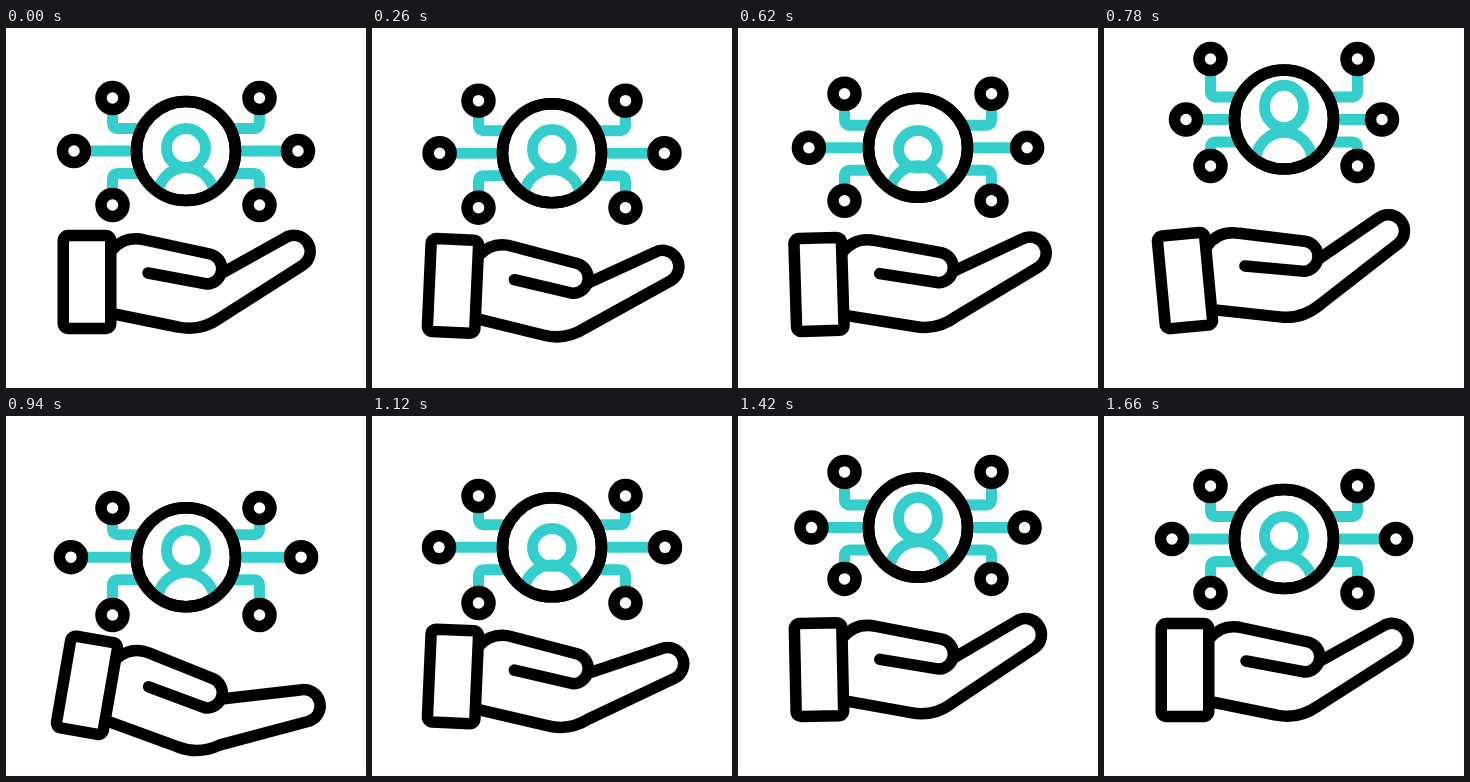
Recreate the animation shown at these times as an HTML page. Size 360 by 360 pixels, loop 1.76 s.

```html
<!DOCTYPE html>
<html lang="en">
<head>
<meta charset="utf-8">
<title>Hand holding a network</title>
<style>
  html, body { margin: 0; width: 100%; height: 100%; overflow: hidden; background: #fff; }
  svg { display: block; width: 100vw; height: 100vh; }
  .ink { fill: none; stroke: #000; stroke-width: 11.5; stroke-linecap: round; stroke-linejoin: round; }
  .teal { fill: none; stroke: #34cfcd; stroke-width: 11; }
  .solid { fill: #fff; }
</style>
</head>
<body>
<svg viewBox="0 0 360 360">
  <defs><clipPath id="clip"><circle id="hole" cx="180" r="50"/></clipPath></defs>
  <path id="wires" class="teal"/>
  <g id="nodes"></g>
  <circle id="ring" class="ink solid" cx="180" r="49.5"/>
  <g clip-path="url(#clip)">
    <ellipse id="head" class="teal" cx="180" rx="19.5"/>
    <path id="body" class="teal"/>
  </g>
  <circle id="rim" class="ink" cx="180" r="49.5"/>
  <g id="arm">
    <path class="ink" d="M25 -32Q38 -47 58 -42L123 -28A15.2 15.2 0 0 1 120 2L61 -9"/>
    <path id="finger" class="ink"/>
    <rect class="ink solid" x="-23.75" y="-46.5" width="47.5" height="93" rx="5"/>
  </g>
</svg>
<script>
const LOOP = 1760;

// Two bounces: share of the lowered and raised pose at each time,
// and how strongly lagging parts trail on the way there
const keys = [
  { at: 220,  low: 0, high: 0,    drag: 0 },
  { at: 375,  low: 1, high: 0,    drag: 0.5 },
  { at: 777,  low: 0, high: 1,    drag: 0.8 },
  { at: 980,  low: 1, high: 0,    drag: 0.5 },
  { at: 1266, low: 0, high: 0.68, drag: 0.5 },
  { at: 1545, low: 0, high: 0,    drag: 0.5 }
];

const parts = {
  angle: { rest: 0,     low: 10.9,  high: -5.4,  lag: -0.3 },
  wrist: { rest: 254,   low: 270.5, high: 252.5, lag: -0.3 },
  flex:  { rest: 0,     low: 11,    high: 0,     lag: 0.2 },
  ring:  { rest: 123,   low: 148.5, high: 91.5,  lag: 0.5 },
  nodes: { rest: 123.5, low: 154.5, high: 84.5,  lag: 0.5 },
  reach: { rest: 112,   low: 118,   high: 98,    lag: 0.7 },
  head:  { rest: 120,   low: 146,   high: 78.5,  lag: 1 }
};

const $ = id => document.getElementById(id);
const set = (el, attrs) => { for (const k in attrs) el.setAttribute(k, attrs[k]); };
const clamp = v => Math.min(1, Math.max(0, v));
const ease = u => (1 - Math.cos(Math.PI * u)) / 2;

const nodes = Array.from({ length: 6 }, () => {
  const c = document.createElementNS("http://www.w3.org/2000/svg", "circle");
  set(c, { class: "ink solid", r: 11.5 });
  return $("nodes").appendChild(c);
});

function valueAt(part, t) {
  let i = 1;
  while (i < keys.length - 1 && t > keys[i].at) i++;
  const a = keys[i - 1], b = keys[i];
  const u = clamp((t - a.at) / (b.at - a.at));
  const k = ease(u ** (1 + part.lag * b.drag));
  const low = a.low + k * (b.low - a.low);
  const high = a.high + k * (b.high - a.high);
  return part.rest + low * (part.low - part.rest) + high * (part.high - part.rest);
}

function drawNetwork(y, nodeY, reach) {
  let wires = `M${180 - reach} ${y}H${180 + reach}`;
  const spots = [];
  for (const side of [-1, 1]) {
    const x = 180 + side * 73.5;
    spots.push([180 + side * reach, y]);
    for (const v of [-1, 1]) {
      const end = nodeY + v * 53.5, turn = y + v * 22.5;
      spots.push([x, end]);
      wires += `M${x} ${end}V${turn + v * 6}Q${x} ${turn} ${x - side * 6} ${turn}H${180 + side * 44}`;
    }
  }
  set($("wires"), { d: wires });
  spots.forEach(([cx, cy], i) => set(nodes[i], { cx, cy }));
  for (const id of ["hole", "ring", "rim"]) set($(id), { cy: y });
}

// The head stretches as it rises inside the ring, the shoulders follow less
function drawPerson(y, head) {
  const lift = y - head;
  set($("head"), { cy: head, ry: 19 + 0.17 * lift });
  const arch = y + 45.5 - 0.36 * lift;
  set($("body"), { d: `M152 ${arch + 40}V${arch}a28 28 0 0 1 56 0v40` });
}

// Coordinates are relative to the middle of the cuff
function drawHand(wrist, angle, flex) {
  set($("arm"), { transform: `translate(81 ${wrist}) rotate(${angle})` });
  const c = Math.cos(flex * Math.PI / 180), s = Math.sin(flex * Math.PI / 180);
  const bend = (x, y) => `${133 + x * c - y * s} ${36 + x * s + y * c}`;
  const slide = 0.85 * flex;
  set($("finger"), {
    d: `M137 -10L${bend(65, -80)}A16.2 16.2 0 0 1 ${bend(83, -53)}`
     + `L${133 + slide} 36Q${113 + slide} 50 ${91 + slide} 45L27 32`
  });
}

function draw(t) {
  const at = name => valueAt(parts[name], t);
  drawNetwork(at("ring"), at("nodes"), at("reach"));
  drawPerson(at("ring"), at("head"));
  drawHand(at("wrist"), at("angle"), at("flex"));
}

const start = performance.now();
function tick() {
  draw((performance.now() - start) % LOOP);
  requestAnimationFrame(tick);
}
tick();
</script>
</body>
</html>
```
